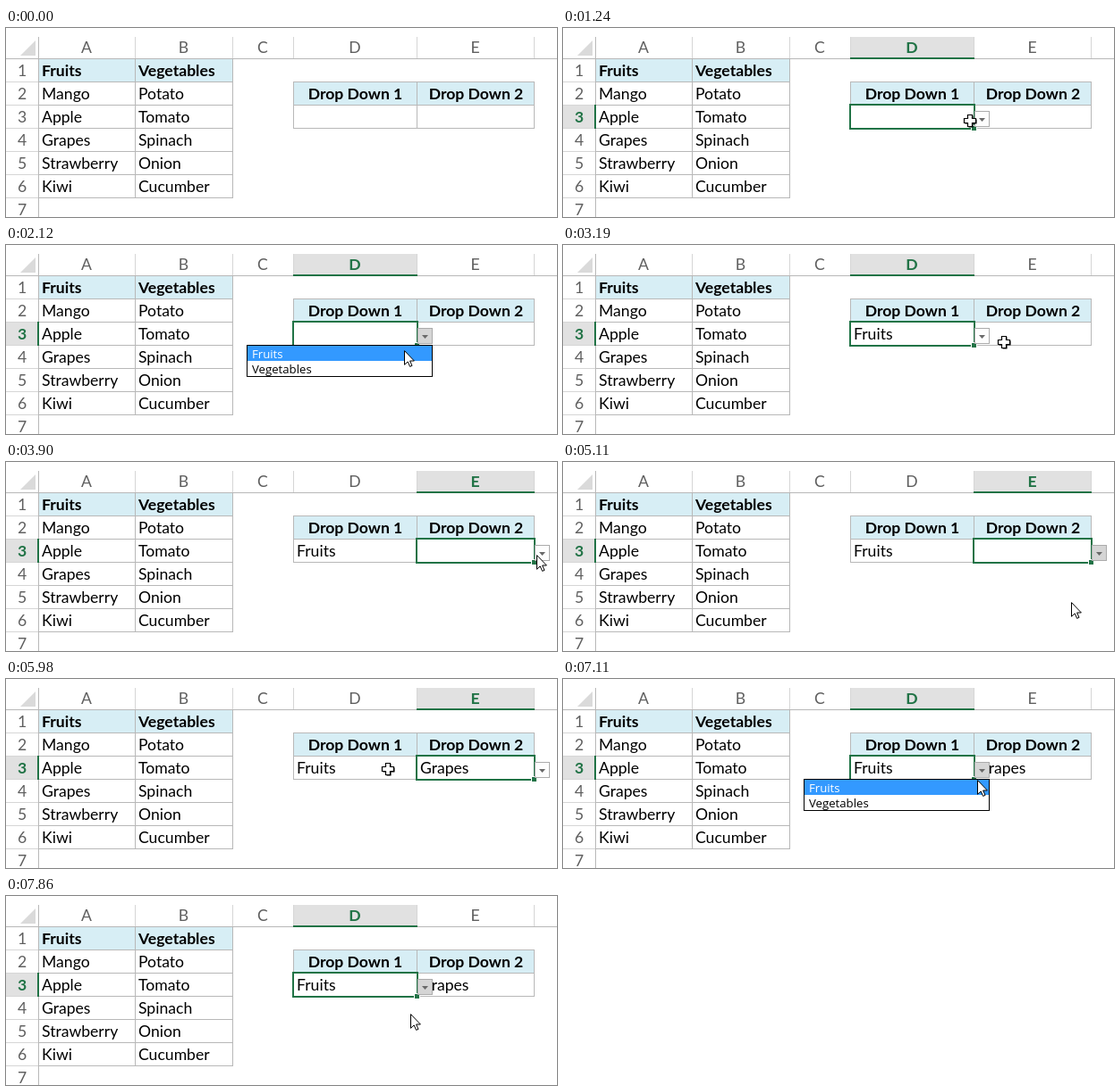
These frames come from a looping animation (616x212 px, 8 s). An HTML page:

```html
<!DOCTYPE html>
<html lang="en">
<head>
<meta charset="utf-8">
<title>Dependent drop downs</title>
<style>
html, body { margin: 0; width: 100%; height: 100%; overflow: hidden; background: #fff; }
svg { display: block; width: 616px; height: 212px; }
text { font: 17.6px Lato, "Open Sans", sans-serif; fill: #000; }
rect, line { shape-rendering: crispEdges; }
.bold { font-weight: 700; }
.mid { text-anchor: middle; }
.head { fill: #5f5f5f; }
.on { fill: #217346; font-weight: 700; }
.item { font: 13.2px "Open Sans", "Noto Sans", sans-serif; }
.pick { fill: #fff; }
</style>
</head>
<body>
<svg viewBox="0 0 616 212" xmlns="http://www.w3.org/2000/svg">
  <g id="sheet"></g>
  <g id="live"></g>
  <g id="cursor"></g>
</svg>
<script>
const LOOP = 8000, STEP = 30;
const GREEN = '#217346', GRID = '#b8b8b8', SOFT = '#d6d6d6', TINT = '#d7eef5';
const colX = [36, 144, 253, 321, 459, 590];
const rowY = n => 34 + (n - 1) * 26;
const fruits = ['Mango', 'Apple', 'Grapes', 'Strawberry', 'Kiwi'];
const vegetables = ['Potato', 'Tomato', 'Spinach', 'Onion', 'Cucumber'];
const $ = id => document.getElementById(id);

// Drawing helpers
const box = (x, y, w, h, fill) => `<rect x="${x}" y="${y}" width="${w}" height="${h}" fill="${fill}"/>`;
const hline = (x1, x2, y, c) => box(x1, y, x2 - x1, 1, c);
const vline = (x, y1, y2, c) => box(x, y1, 1, y2 - y1, c);
const label = (x, y, s, cls = '') => `<text x="${x}" y="${y}" class="${cls}">${s}</text>`;
const cell = (col, row, s, cls) => label(colX[col] + 4, rowY(row) + 20, s, cls);
const colName = (i, cls) => label((colX[i] + colX[i + 1]) / 2, 28, 'ABCDE'[i], 'mid ' + cls);
const rowName = (n, cls) => label(18, rowY(n) + 20, n, 'mid ' + cls);

function table(c1, c2, r1, r2) {
  let s = box(colX[c1], rowY(r1), colX[c2] - colX[c1], 26, TINT);
  for (let r = r1; r <= r2; r++) s += hline(colX[c1], colX[c2] + 1, rowY(r), GRID);
  for (let c = c1; c <= c2; c++) s += vline(colX[c], rowY(r1), rowY(r2), GRID);
  return s;
}

function drawSheet() {
  let s = '<path d="M33 14V31H16Z" fill="#dadada"/>';
  s += hline(0, 616, 34, GRID) + vline(36, 10, 212, GRID);
  colX.slice(1).forEach(x => s += vline(x, 10, 34, SOFT));
  for (let n = 2; n <= 7; n++) s += hline(0, 36, rowY(n), SOFT);
  s += table(0, 2, 1, 7) + table(3, 5, 2, 4);
  s += cell(0, 1, 'Fruits', 'bold') + cell(1, 1, 'Vegetables', 'bold');
  fruits.forEach((f, i) => s += cell(0, i + 2, f) + cell(1, i + 2, vegetables[i]));
  s += label(390.5, 80, 'Drop Down 1', 'bold mid') + label(525.5, 80, 'Drop Down 2', 'bold mid');
  for (let i = 0; i < 5; i++) s += colName(i, 'head');
  for (let n = 1; n <= 7; n++) s += rowName(n, 'head');
  return s;
}

// Value of the last entry that has begun
const at = (track, t) => track.reduce((v, k) => t >= k[0] ? k[1] : v, track[0][1]);

const selected = [[0, 0], [1000, 3], [3570, 4], [6180, 3]];
const pressed = [[0, 0], [1720, 1], [2840, 0], [4220, 1], [5410, 0], [6930, 1]];
const opened = [[0, 0], [1780, 1], [2580, 0], [4250, 1], [5110, 0], [6960, 1], [7860, 0]];
const hovered = [[0, -1], [2060, 0], [4250, -1], [4430, 0], [4770, 1], [4920, 2], [6960, 0], [7350, 1]];
const pointer = [[0, ''], [390, 'cross'], [1330, 'arrow'], [3070, 'cross'], [3810, 'arrow'], [5710, 'cross'], [6480, 'arrow']];

const ease = {
  lin: p => p,
  in: p => p * p,
  out: p => 1 - (1 - p) * (1 - p),
  io: p => p * p * (3 - 2 * p)
};

// Pointer path: time, x, y, easing towards the next point
const path = [
  [360, 616, 158, 'out'], [840, 412, 105], [970, 412, 105, 'io'],
  [1240, 455, 104, 'out'], [1390, 463, 104], [1910, 463, 104, 'io'],
  [2180, 442, 120], [3040, 442, 120, 'in'], [3190, 493, 109, 'out'],
  [3430, 530, 100], [3570, 530, 100, 'io'], [3870, 592, 104],
  [3900, 593, 104], [4060, 594, 104], [4260, 594, 104, 'lin'],
  [4740, 571, 139, 'out'], [5010, 568, 157], [5680, 568, 157, 'io'],
  [5980, 427, 101], [6180, 427, 101, 'io'], [6630, 465, 106],
  [6960, 465, 106, 'in'], [7110, 463, 113, 'out'], [7500, 452, 132]
];

function pointerAt(t) {
  let i = path.length - 1;
  while (i > 0 && path[i][0] > t) i--;
  const [t0, x, y, e] = path[i], next = path[i + 1];
  if (!e || !next || t < t0) return [x, y];
  const held = Math.floor((t - t0) / STEP) * STEP;
  const p = ease[e](held / (next[0] - t0));
  return [Math.round(x + (next[1] - x) * p), Math.round(y + (next[2] - y) * p)];
}

function button(x, down) {
  return box(x, 93, 17, 18, '#ababab') + box(x + 1, 94, 15, 16, down ? '#d5d5d5' : '#fdfdfd') +
    `<path d="M${x + 5} 101h7l-3.5 4z" fill="#686868"/>`;
}

function list(x, w, items, row) {
  let s = box(x, 112, w, items.length * 17 + 2, '#000') + box(x + 1, 113, w - 2, items.length * 17, '#fff');
  items.forEach((name, i) => {
    const y = 113 + i * 17, on = i === row;
    if (on) s += box(x + 1, y, w - 2, 17, '#3399ff');
    s += label(x + 6, y + 13.5, name, on ? 'item pick' : 'item');
  });
  return s;
}

function selection(col, t) {
  const x = colX[col], end = colX[col + 1], w = end - x;
  let s = box(x + 1, 10, w - 1, 24, '#e1e1e1') + box(x, 33, w + 1, 2, GREEN) + colName(col, 'on');
  s += box(0, 87, 36, 25, '#e1e1e1') + box(35, 86, 2, 27, GREEN) + rowName(3, 'on');
  s += `<rect x="${x}" y="86" width="${w + 1}" height="27" fill="none" stroke="${GREEN}" stroke-width="2"/>`;
  s += box(end - 3, 109, 7, 7, '#fff') + box(end - 2, 110, 5, 5, GREEN);
  s += button(end + 1, at(pressed, t));
  if (at(opened, t)) {
    const row = at(hovered, t);
    s += col === 3 ? list(269, 208, ['Fruits', 'Vegetables'], row) : list(407, 201, fruits, row);
  }
  return s;
}

const plus = 'M-2.5-6.5h5v4h4v5h-4v4h-5v-4h-4v-5h4z';
const shapes = {
  '': '',
  cross: `<path d="${plus}" transform="translate(1 1)"/><path d="${plus}" fill="#fff" stroke="#000" stroke-width="1.2"/>`,
  arrow: '<path d="M.5.6V16.3L4.2 12.9 6.6 18.4 9 17.4 6.6 12H11.4Z" fill="#fff" stroke="#000"/>'
};

let shown = { live: '', cursor: '' };
function put(id, html) {
  if (shown[id] !== html) $(id).innerHTML = shown[id] = html;
}

function draw(t) {
  const col = at(selected, t);
  let s = '';
  if (t >= 2840) s += cell(3, 3, 'Fruits');
  if (t >= 5410) s += cell(4, 3, 'Grapes');
  if (col) s += selection(col, t);
  put('live', s);
  put('cursor', `<g transform="translate(${pointerAt(t)})">${shapes[at(pointer, t)]}</g>`);
}

$('sheet').innerHTML = drawSheet();
const start = performance.now();
function tick() {
  draw((performance.now() - start) % LOOP);
  requestAnimationFrame(tick);
}
tick();
</script>
</body>
</html>
```
